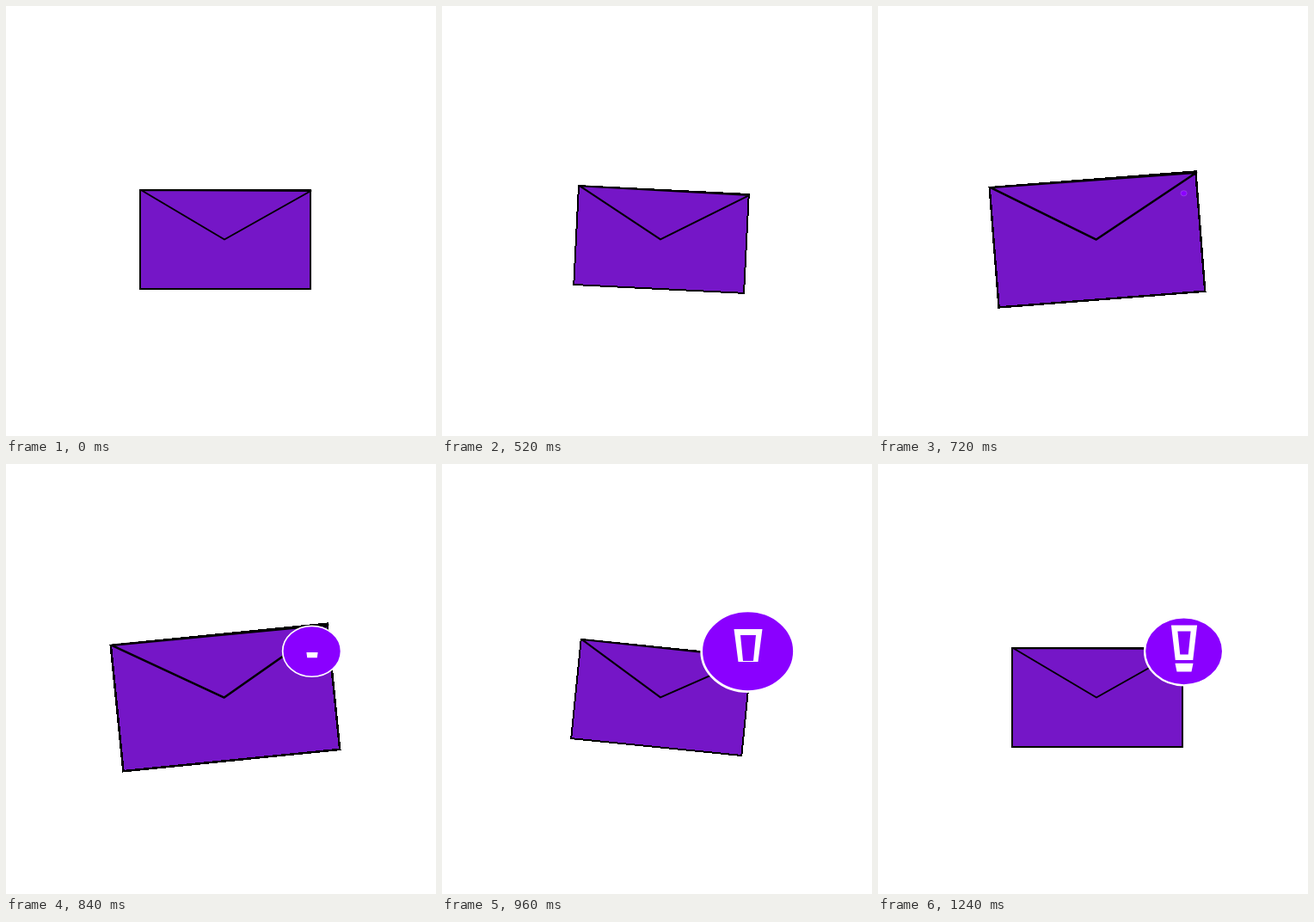
Animation, 500 px wide and 500 px high, one loop 2 s. Source, as an HTML page:

```html
<!DOCTYPE html>
<html lang="en">
<head>
<meta charset="utf-8">
<title>New message</title>
<style>
  html, body { margin: 0; width: 100%; height: 100%; overflow: hidden; background: #fff; }
  svg { display: block; width: 100%; height: 100%; }
  #envelope { fill: #7516c7; stroke: #000; stroke-width: 2; stroke-linejoin: round; }
  #envelope rect { shape-rendering: crispEdges; stroke-linejoin: miter; }
  #disc { fill: #8a00ff; stroke: #fff; stroke-width: 2.3; }
  #mark { fill: #fff; fill-rule: evenodd; }
</style>
</head>
<body>
<svg viewBox="0 0 500 500">
  <g id="envelope">
    <rect x="156" y="214" width="198" height="115"/>
    <path d="M157 214L254 271.5L354.5 215Z"/>
  </g>
  <ellipse id="disc" rx="45.5" ry="39.5"/>
  <path id="mark"/>
</svg>
<script>
const LOOP = 2000, STEP = 40;
const PEAK = 800, SWING_END = 960, REST = 1240;
const TILT = 0.1 * 180 / Math.PI;

const envelope = document.getElementById('envelope');
const disc = document.getElementById('disc');
const mark = document.getElementById('mark');

const mix = (a, b, t) => a + (b - a) * t;
const progress = (time, from, to) => Math.min(1, Math.max(0, (time - from) / (to - from)));
const easeIn = t => t * t;
const easeInOut = t => t < 0.5 ? 2 * t * t : 1 - 2 * (1 - t) ** 2;
const easeSine = t => (1 - Math.cos(Math.PI * t)) / 2;

// Tilts right, swings left around the peak, tilts right again and settles.
function tilt(time) {
  const distance = Math.abs(time - PEAK);
  const reach = time < PEAK ? 400 : REST - PEAK;
  return distance < 160
    ? TILT * mix(-1, 1, easeIn(progress(distance, 40, 160)))
    : TILT * (1 - easeInOut(progress(distance, 160, reach)));
}

const zoom = time => 1 + 0.3 * Math.sin(Math.PI * progress(time, 638, 962));

const trapezoid = (top, height, topWidth, bottomWidth) => {
  const x = 356, bottom = top + height;
  return `M${x - topWidth / 2} ${top}H${x + topWidth / 2}` +
    `L${x + bottomWidth / 2} ${bottom}H${x - bottomWidth / 2}Z`;
};

// Exclamation mark: the hollow stem grows upwards, then the lower bar opens.
function markPath(grow, settle) {
  const height = mix(38 * grow ** 2, 40.5, settle);
  const top = mix(mix(222, 230, grow), 228, settle) - height;
  const topWidth = mix(33 * grow, 30.2, settle);
  const bottomWidth = mix(mix(33, 23, grow) * grow, 20.5, settle);
  const hollow = Math.max(0, height - mix(8, 13.5, settle));
  return trapezoid(top, height, topWidth, bottomWidth) +
    (hollow ? trapezoid(top + 7, hollow, topWidth - 15, bottomWidth - 11) : '') +
    trapezoid(mix(230, 231.7, settle), 9.8 * settle, 21, 17);
}

function draw(now) {
  const time = Math.floor((now % LOOP) / STEP) * STEP;
  const settle = easeInOut(progress(time, SWING_END, REST));
  const pop = easeSine(progress(time, 672, SWING_END));
  const size = pop * mix(1.185, 1, settle);

  envelope.setAttribute('transform',
    `translate(255 271.7) rotate(${tilt(time)}) scale(${zoom(time)}) translate(-255 -271.7)`);
  disc.setAttribute('transform', `translate(355.6 217.8) scale(${size})`);
  mark.setAttribute('d', markPath(progress(time, 760, SWING_END), settle));
}

const start = performance.now();
function tick() {
  draw(performance.now() - start);
  requestAnimationFrame(tick);
}
tick();
</script>
</body>
</html>
```
